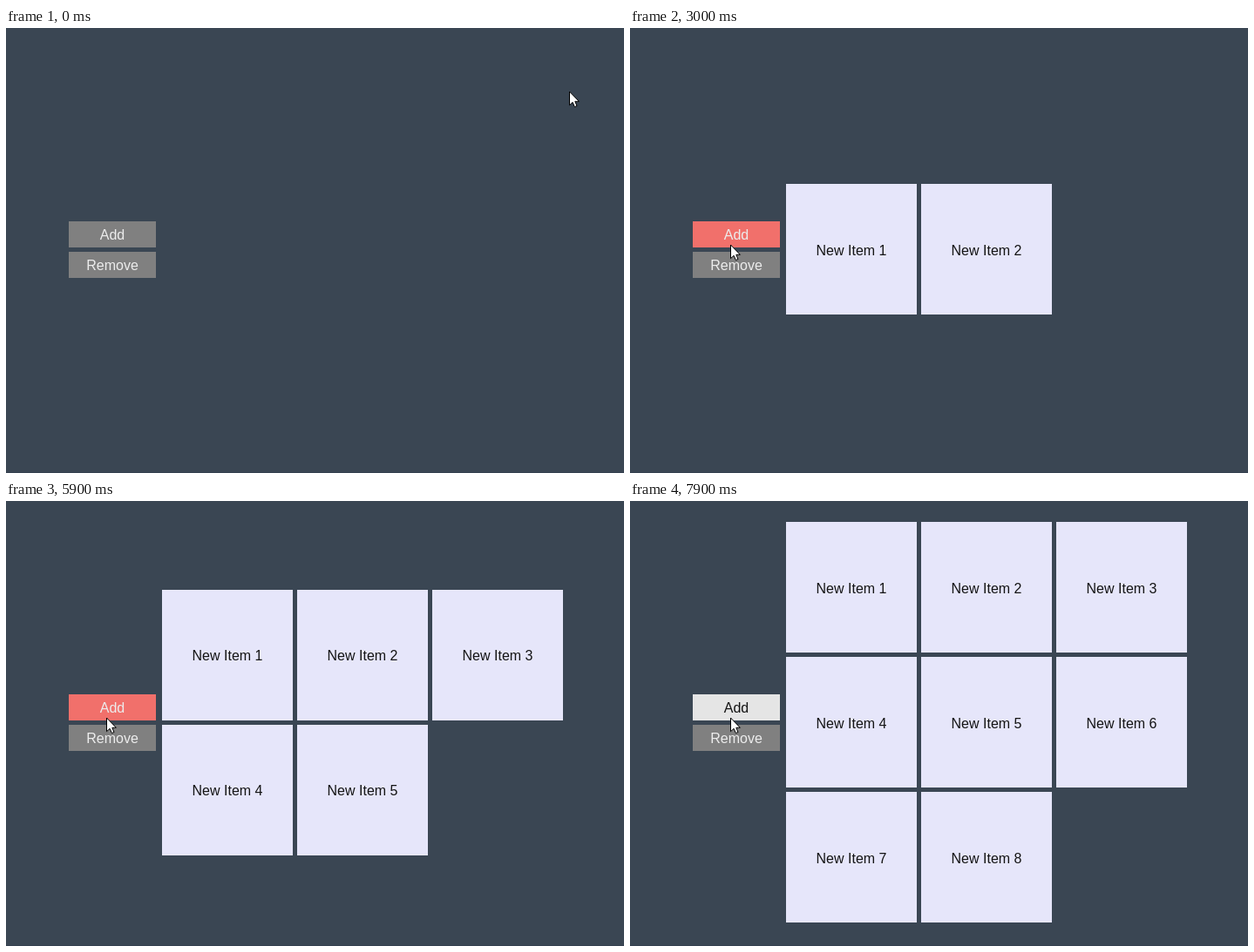
Animation of 709x511 px, one loop 8000 ms. Source, as an HTML page:

```html
<!DOCTYPE html>
<html lang="en">
<head>
<meta charset="utf-8">
<title>Add items</title>
<style>
  html, body { margin: 0; width: 100%; height: 100%; overflow: hidden; background: #3a4653; }
  svg { display: block; width: 709px; height: 511px; }
  text { font: 16px "Liberation Sans", Arial, sans-serif; text-anchor: middle; }
  .button rect { fill: #808080; }
  .button text { fill: #ececec; }
  .pressed rect { fill: #f1706b; }
  .active rect { fill: #e5e5e5; }
  .active text { fill: #141414; }
  .item rect { fill: #e6e6fa; }
  .item text { fill: #141414; }
</style>
</head>
<body>
<svg id="stage" viewBox="0 0 709 511">
  <rect y="510" width="709" height="1" fill="#344050"/>
</svg>
<script>
const LOOP = 8000;
const SIZE = 150, STEP = 155, COLUMNS = 3;

// Each click: [press time, release time]
const clicks = [
  [900, 1100], [1900, 2100], [3000, 3100], [3800, 3900],
  [4900, 5000], [5900, 6000], [6800, 7000], [7800, 7900]
];

// Top of the first row and label baseline within a box, by row count
const layouts = [null, { top: 179, base: 82 }, { top: 102, base: 81 }, { top: 24, base: 82 }];

const stage = document.getElementById('stage');

function add(parent, tag, attrs, content = '') {
  const el = document.createElementNS('http://www.w3.org/2000/svg', tag);
  for (const key in attrs) el.setAttribute(key, attrs[key]);
  el.textContent = content;
  return parent.appendChild(el);
}

function box(className, width, height, base, label) {
  const group = add(stage, 'g', { class: className });
  add(group, 'rect', { width, height });
  const text = add(group, 'text', { x: width / 2, y: base }, label);
  return { group, text };
}

function place(el, x, y) {
  el.setAttribute('transform', `translate(${x} ${y})`);
}

const addButton = box('button', 100, 30, 21, 'Add').group;
const removeButton = box('button', 100, 30, 21, 'Remove').group;
place(addButton, 72, 222);
place(removeButton, 72, 257);

const items = clicks.map((_, i) => box('item', SIZE, SIZE, 82, `New Item ${i + 1}`));

const cursor = add(stage, 'path', {
  d: 'M.5 1V16.7L4.1 13.3L6.4 18.6L9 17.5L6.8 12.3H11.4Z',
  fill: '#fff', stroke: '#000', 'stroke-width': 1
});

function drawCursor(time) {
  const p = Math.min(Math.floor(time / 100), 7) / 7;
  const ease = p * p * (3 - 2 * p);
  place(cursor, Math.round(646 - 531 * ease), Math.round(72 + 176 * ease));
}

function drawButton(time) {
  const pressed = clicks.some(([down, up]) => time >= down && time < up);
  const active = !pressed && time >= clicks[0][1];
  addButton.setAttribute('class', 'button' + (pressed ? ' pressed' : active ? ' active' : ''));
}

function drawItems(time) {
  const count = clicks.filter(([, up]) => time >= up).length;
  const layout = layouts[Math.ceil(count / COLUMNS)];
  items.forEach(({ group, text }, i) => {
    const shown = i < count;
    group.style.display = shown ? '' : 'none';
    if (!shown) return;
    place(group, 179 + i % COLUMNS * STEP, layout.top + Math.floor(i / COLUMNS) * STEP);
    text.setAttribute('y', layout.base);
  });
}

function draw(time) {
  drawCursor(time);
  drawButton(time);
  drawItems(time);
}

const start = performance.now();
function tick() {
  draw((performance.now() - start) % LOOP);
  requestAnimationFrame(tick);
}
tick();
</script>
</body>
</html>
```
